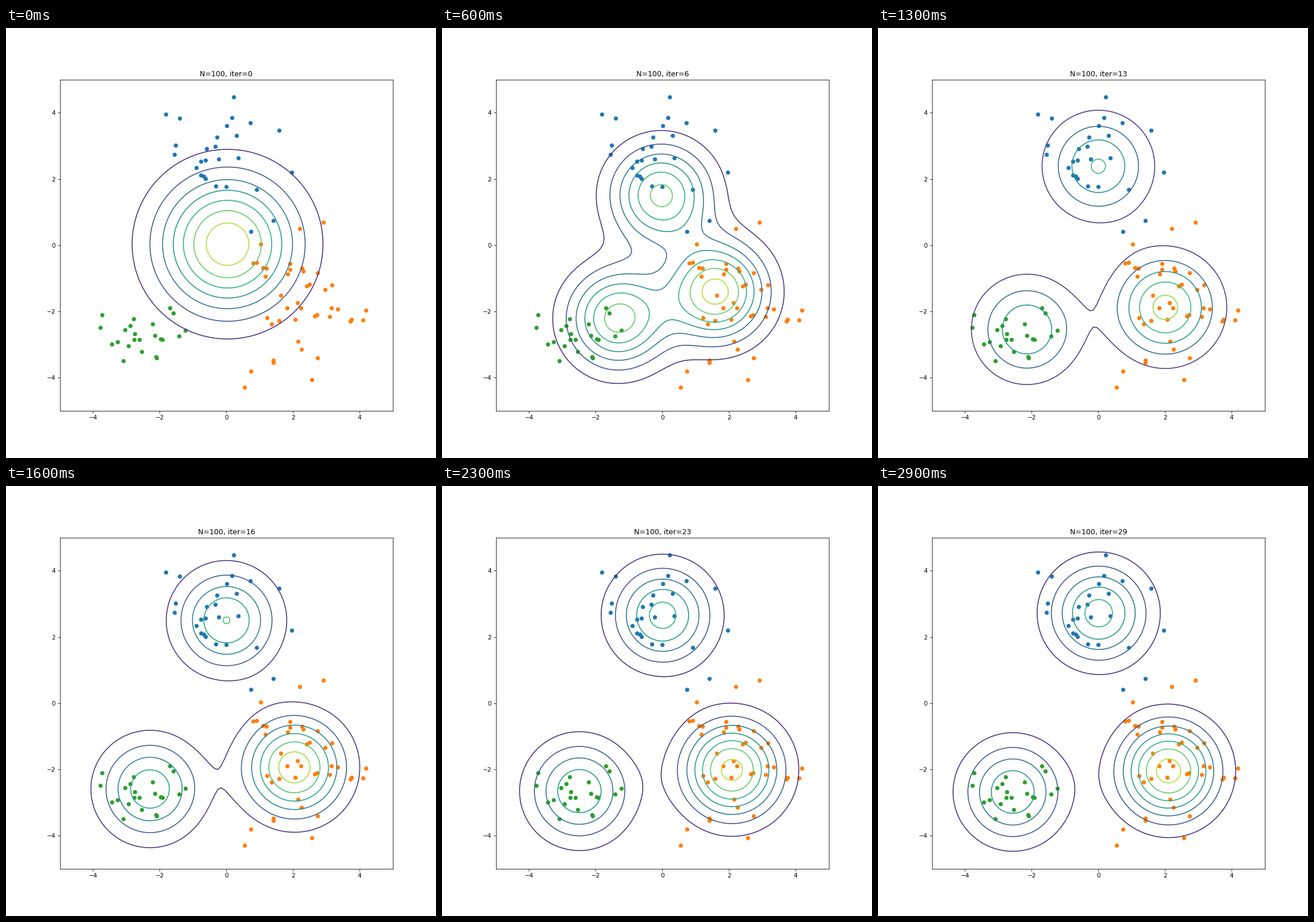
A matplotlib script that plays this animation: 748 px wide and 748 px high, repeating every 3000 ms.

```python
import numpy as np
import matplotlib.pyplot as plt
from matplotlib.animation import FuncAnimation

SIZE = 748
STEPS = 30

# Each cluster: sample count, centre, spread.
CLUSTERS = [
    (28, (0, 2.75), (0.95, 1.1)),
    (44, (2.15, -2.1), (0.95, 1.15)),
    (25, (-2.75, -2.75), (0.8, 0.85)),
]

# Each mixture component passes these (mean x, mean y, weight) at KEYS.
KEYS = np.array([0, 3, 9, 29])
START = (0.035, 0.03, 0.0325)
PATHS = [
    [START, (-0.08, 0.62, 0.0313), (-0.006, 2.153, 0.0274), (0.01, 2.718, 0.0287)],
    [START, (1.18, -0.9, 0.0336), (1.941, -1.764, 0.0345), (2.106, -2.048, 0.0394)],
    [START, (-0.6, -1.89, 0.0333), (-1.85, -2.449, 0.0274), (-2.57, -2.683, 0.0259)],
]


def ease(t):
    """Exponential approach to the final state."""
    return 1 - np.exp(-0.115 * t)


def component(path, t):
    return [np.interp(ease(t), ease(KEYS), track) for track in zip(*path)]


def density(t):
    """Unnormalised mixture whose mass grows with every iteration."""
    var = 1 + 1 / (1 + 6 * t)
    total = np.zeros_like(gx)
    for path in PATHS:
        mx, my, w = component(path, t)
        d2 = (gx - mx) ** 2 + (gy - my) ** 2
        total += (t + 1) * w * np.exp(-d2 / (2 * var)) / (2 * np.pi * var)
    return total


fig, ax = plt.subplots(figsize=(10, 10), dpi=SIZE / 10)
ax.set(xlim=(-5, 5), ylim=(-5, 5), autoscale_on=False)

rng = np.random.default_rng(4)
for count, centre, spread in CLUSTERS:
    ax.scatter(*rng.normal(centre, spread, (count, 2)).T)

grid = np.linspace(-5, 5, 100)
gx, gy = np.meshgrid(grid, grid)
lines = []


def draw(t):
    while lines:
        lines.pop().remove()
    lines.append(ax.contour(gx, gy, density(t)))
    ax.set_title(f"N=100, iter={t}")
    return []


anim = FuncAnimation(fig, draw, frames=STEPS, interval=100,
                     init_func=lambda: [], repeat=True, repeat_delay=0)
plt.show()
```
